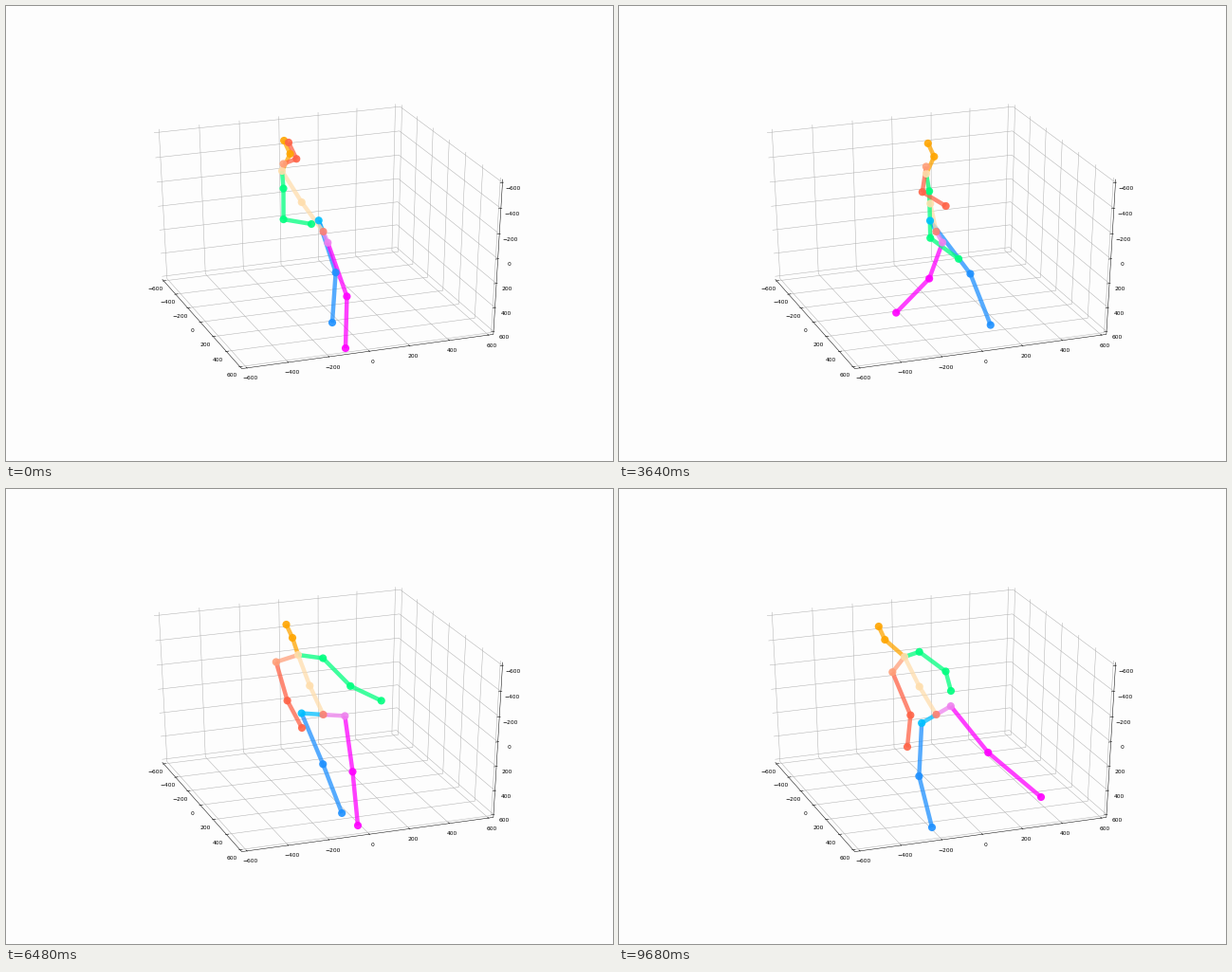
Write a matplotlib script that moves like this. It is 640 px wide and 480 px high and loops after 9720 ms.

```python
import matplotlib.pyplot as plt
import numpy as np
from matplotlib.animation import FuncAnimation
from matplotlib.collections import LineCollection

W, H, DPI = 640, 480, 80
FRAMES, STEP = 243, 40
TIME = np.arange(FRAMES) * STEP / 1000
BG = "#fdfdfd"
EDGE = 625
HAIR = 0.45

# Camera: unit cube seen from elevation 30, azimuth -110, distance 10
ELEV, AZIM = np.radians(30), np.radians(-110)
CENTER = np.array([334.7, 238.3])
SCALE = np.array([268.1, 178.0])
RIGHT = np.array([-np.sin(AZIM), np.cos(AZIM), 0])
VIEW = np.array([np.cos(ELEV) * np.cos(AZIM), np.cos(ELEV) * np.sin(AZIM), np.sin(ELEV)])
UP = np.cross(VIEW, RIGHT)

fig = plt.figure(figsize=(W / DPI, H / DPI), dpi=DPI, facecolor=BG)
ax = fig.add_axes([0, 0, 1, 1])
ax.set_xlim(0, W)
ax.set_ylim(H, 0)
ax.axis("off")


def project(x, y, z):
    p = np.array([x, -y, -z]) / 1200
    depth = 1 - p @ VIEW / 10
    return CENTER + SCALE * np.array([p @ RIGHT, -(p @ UP)]) / depth


def route(*points):
    return [project(*p) for p in points]


def label(pos, dx, dy, value):
    text = str(value).replace("-", "\u2212")
    ax.text(pos[0] + dx, pos[1] + dy, text, fontsize=5.4, ha="center", va="center", family="DejaVu Sans")


def draw_box():
    e, out, into = EDGE, EDGE + 6, EDGE - 12
    grid = []
    axes = [route((-e, -e, e), (-e, e, e), (e, e, e), (e, e, -e))]
    for t in range(-600, 601, 200):
        grid += [
            route((t, e, e), (t, -e, e), (t, -e, -e)),
            route((-e, t, e), (e, t, e), (e, t, -e)),
            route((-e, -e, t), (e, -e, t), (e, e, t)),
        ]
        axes += [
            route((t, out, e), (t, into, e)),
            route((-out, t, e), (-into, t, e)),
            route((out, e, t), (into, e, t)),
        ]
        label(project(t, e, e), 3.5, 11, t)
        label(project(-e, t, e), -8.5, 8.8, t)
        label(project(e, e, t), 11.5, 6, t)
    ax.add_collection(LineCollection(grid, colors="#b0b0b0", linewidths=HAIR, zorder=1))
    ax.add_collection(LineCollection(axes, colors="black", linewidths=HAIR, zorder=2))


def ease(ts, vs):
    """Cubic curve through the keys that never overshoots them."""
    gap = np.diff(ts)
    rate = np.diff(vs) / gap
    a, b = rate[:-1], rate[1:]
    same = a * b > 0
    inner = np.where(same, 2 * a * b / np.where(same, a + b, 1), 0)
    slope = np.r_[rate[0], inner, rate[-1]]
    k = np.clip(np.searchsorted(ts, TIME, side="right") - 1, 0, len(gap) - 1)
    u = (TIME - ts[k]) / gap[k]
    return (
        vs[k] * (1 + 2 * u) * (1 - u) ** 2
        + vs[k + 1] * u * u * (3 - 2 * u)
        + gap[k] * u * (1 - u) * (slope[k] * (1 - u) - slope[k + 1] * u)
    )


def path(*keys):
    """Track through (seconds, x, y) keys."""
    t, x, y = np.array(keys, float).T
    return np.column_stack([ease(t, x), ease(t, y)])


def vec(x, y):
    return np.column_stack(np.broadcast_arrays(x, y, TIME)[:2])


def turn(middle, swing, when, length):
    """Heading in radians, from walking to the right to facing left."""
    return np.radians(middle - swing * np.tanh((TIME - when) / length))


def across(angle, wide, high):
    """Half the width of the body, seen at a heading."""
    return vec(wide * np.cos(angle), high * np.sin(angle))


def build_body():
    hips = turn(14, 64, 6.3, 1.6)
    shoulders = turn(17, 73, 6.0, 1.3)
    facing = np.sin(hips)
    j = {"pelvis": vec(334.5, 238)}

    # The trunk leans with the chest; the head looks along the heading
    chest = path((0, 291, 174), (1.52, 307, 179), (2.56, 326, 180),
                 (4.68, 320, 174), (6.48, 308, 175), (9.68, 301, 177))
    j["chest"] = chest
    j["spine"] = (j["pelvis"] + chest) / 2 + (-1, 1)
    j["neck"] = chest + vec(-8 + 17 * facing, -18)
    j["head"] = j["neck"] + (-6.5, -14)

    feet = {
        "r": path((0, 344, 334), (1.52, 330, 328), (2.56, 388, 321), (3.0, 417, 331),
                  (4.68, 323, 341), (5.5, 302, 330), (7.2, 387, 351), (9.68, 330, 357)),
        "l": path((0, 358, 361), (1.8, 374, 355), (2.56, 355, 345), (3.4, 279, 322),
                  (4.68, 422, 343), (6.48, 371, 355), (7.88, 362, 332), (9.68, 445, 325)),
    }
    hands = {
        "r": path((0, 298, 144), (0.4, 300, 131), (1.52, 348, 211), (4.68, 341, 211),
                  (6.48, 312, 252), (7.88, 301, 252), (9.68, 304, 272)),
        "l": path((0, 322, 230), (1.52, 331, 279), (2.56, 348, 283), (4.68, 369, 243),
                  (5.9, 402, 226), (7.88, 365, 219), (9.68, 350, 213)),
    }
    for side, sign, sag in (("r", -1, 0), ("l", 1, 8)):
        hip = j["pelvis"] + sign * across(hips, 23, 12)
        shoulder = chest + (1.5, 5.5) + sign * across(shoulders, 25, 13)
        foot, hand = feet[side], hands[side]
        # Knees bend forward, elbows backward unless the hand is raised
        hang = np.clip((hand[:, 1] - shoulder[:, 1]) / 30, -1, 1)
        j["hip_" + side] = hip
        j["knee_" + side] = (hip + foot) / 2 + vec(11 * facing, 1)
        j["foot_" + side] = foot
        j["shoulder_" + side] = shoulder
        j["elbow_" + side] = (shoulder + hand) / 2 + vec(-15 * facing * hang, 6 + sag * facing)
        j["hand_" + side] = hand
    return j


# Chains of joints, each with the colours of its bones
CHAINS = [
    ("pelvis hip_r knee_r foot_r", "deepskyblue dodgerblue dodgerblue"),
    ("pelvis hip_l knee_l foot_l", "violet magenta magenta"),
    ("pelvis spine chest neck head", "navajowhite navajowhite orange orange"),
    ("chest shoulder_l elbow_l hand_l", "springgreen springgreen springgreen"),
    ("chest shoulder_r elbow_r hand_r", "lightsalmon tomato tomato"),
]
BONES = []
for names, tints in CHAINS:
    names = names.split()
    BONES += zip(names, names[1:], tints.split())

joints = build_body()
draw_box()
colors = [c for *_, c in BONES]
bones = LineCollection([], colors=colors, linewidths=4, alpha=0.75, zorder=3)
ax.add_collection(bones)
dots = ax.scatter(
    np.zeros(len(BONES) + 1),
    np.zeros(len(BONES) + 1),
    s=54,
    c=["salmon"] + colors,
    alpha=0.9,
    linewidths=0,
    zorder=4,
)


def update(i):
    bones.set_segments([(joints[a][i], joints[b][i]) for a, b, _ in BONES])
    dots.set_offsets([joints["pelvis"][i]] + [joints[b][i] for _, b, _ in BONES])
    return bones, dots


anim = FuncAnimation(fig, update, frames=FRAMES, interval=STEP, repeat=True, repeat_delay=0, blit=False)
plt.show()
```
